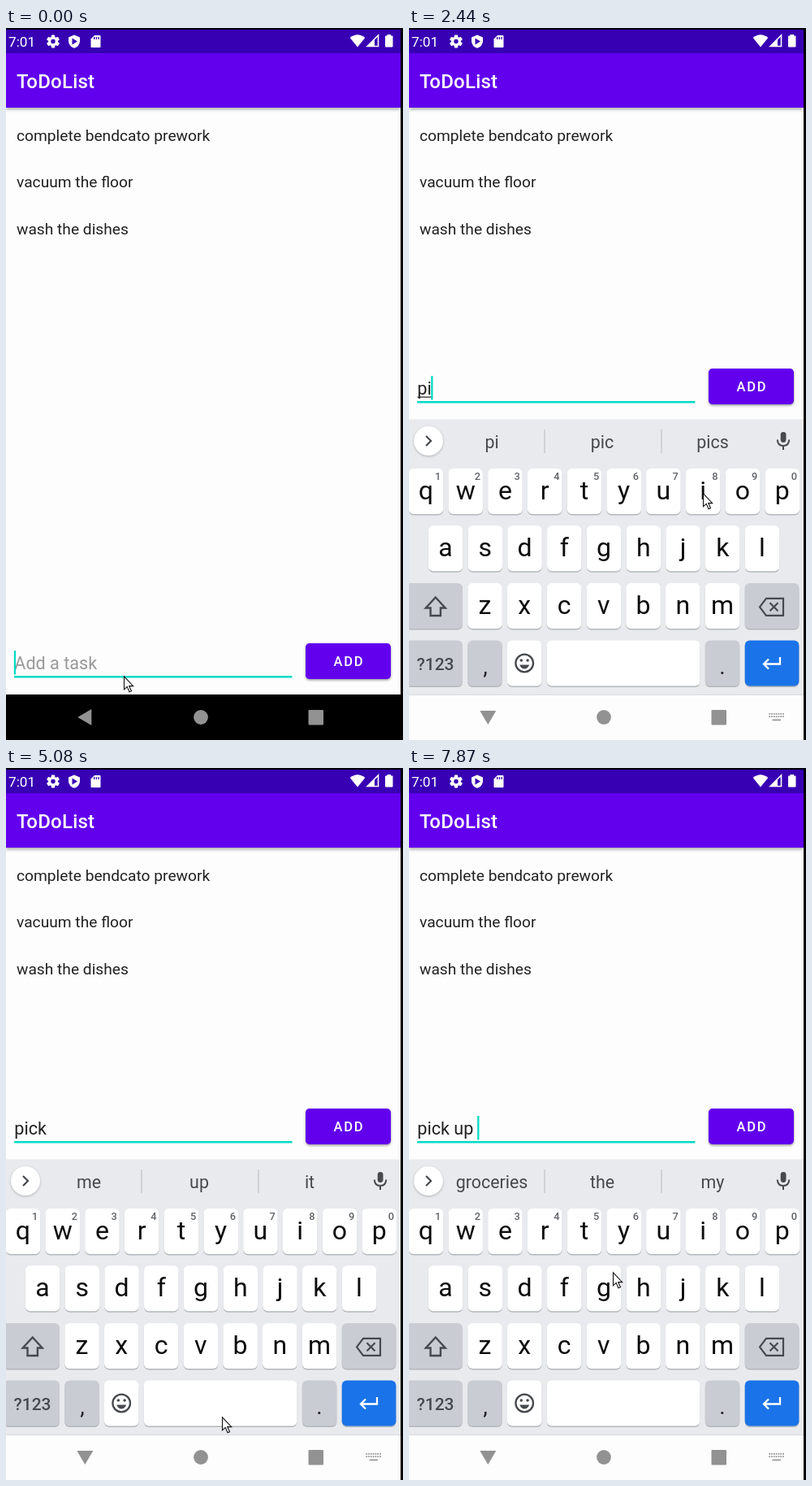
Recreate the animation shown at these times as an HTML page with a canvas. Size 489 px wide and 876 px high, loop 8 s.

```html
<!DOCTYPE html>
<html lang="en">
<head>
<meta charset="utf-8">
<title>To-do list</title>
<style>
html, body { margin: 0; width: 100%; height: 100%; overflow: hidden; background: #000; }
canvas { display: block; }
</style>
</head>
<body>
<canvas id="stage" width="489" height="876"></canvas>
<script>
const ctx = document.getElementById('stage').getContext('2d');
const LOOP = 8000, W = 486, LIFT = 338;
const INK = '#46494d', TEAL = '#03dac5', PURPLE = '#6200ee';

// The screen refreshes in evenly spaced bursts: [first, last, steps]
const ticks = [0, 150];
for (const [a, b, n] of [[430, 1460, 8], [1750, 2710, 8], [2860, 3850, 8], [4000, 4960, 8],
  [5080, 5740, 6], [6040, 6970, 8], [7090, 7870, 7]]) {
  for (let i = 0; i < n; i++) ticks.push(Math.round(a + (b - a) * i / (n - 1)));
}

// Edits: time, text, composing, suggestions
const edits = [
  [-70, '', false, null],
  [1880, 'p', true, ['p', 'pick', 'put']],
  [2430, 'pi', true, ['pi', 'pic', 'pics']],
  [3560, 'pic', true, ['pic', 'pick', 'pics']],
  [4130, 'pick', true, ['pick', 'picked', 'pics']],
  [4540, 'pick ', false, ['me', 'up', 'it']],
  [6560, 'pick up', false, ['groceries', 'the', 'g']],
  [7480, 'pick up ', false, ['groceries', 'the', 'my']]
];

// Pointer path: time, x, y
const path = [
  [0, 145, 797], [149, 145, 797], [150, 155, 789], [577, 158, 786], [724, 179, 768],
  [1460, 456, 568], [1890, 456, 568], [2299, 365, 570], [2436, 362, 572], [2710, 273, 729],
  [2860, 215, 743], [3280, 178, 713], [3567, 178, 713], [3850, 250, 685], [4130, 381, 640],
  [4274, 381, 640], [4549, 275, 808], [5080, 266, 798], [5400, 342, 782], [5740, 335, 760],
  [6430, 251, 512], [6970, 251, 512], [7350, 240, 840], [7480, 240, 844], [7860, 251, 620]
];

const clamp = v => Math.max(0, Math.min(1, v));
const lastBefore = (list, t, key) => list.filter(e => key(e) <= t).pop();

function rect(x, y, w, h, color, r = 0) {
  ctx.fillStyle = color;
  ctx.beginPath();
  ctx.roundRect(x, y, w, h, r);
  ctx.fill();
}

function disc(x, y, r, color) {
  ctx.fillStyle = color;
  ctx.beginPath();
  ctx.arc(x, y, r, 0, Math.PI * 2);
  ctx.fill();
}

function text(s, x, y, size, color, { weight = 400, align = 'left', space = 0 } = {}) {
  ctx.font = `${weight} ${size}px Roboto, sans-serif`;
  ctx.letterSpacing = space + 'px';
  ctx.textAlign = align;
  ctx.fillStyle = color;
  ctx.fillText(s, x, y);
  return ctx.measureText(s).width;
}

function shape(d, x, y, { fill, stroke, width = 2 } = {}) {
  const p = new Path2D(d);
  ctx.save();
  ctx.translate(x, y);
  ctx.lineWidth = width;
  if (fill) { ctx.fillStyle = fill; ctx.fill(p); }
  if (stroke) { ctx.strokeStyle = stroke; ctx.stroke(p); }
  ctx.restore();
}

function shadow(blur, dy, color, draw) {
  ctx.save();
  ctx.shadowBlur = blur;
  ctx.shadowOffsetY = dy;
  ctx.shadowColor = color;
  draw();
  ctx.restore();
}

function statusBar() {
  const bar = '#3700b3', on = '#fff';
  rect(0, 2, W, 29, bar);
  text('7:01', 3, 23, 17.2, on);
  for (let i = 0; i < 6; i++) {
    ctx.save();
    ctx.translate(58, 16.5);
    ctx.rotate(i * Math.PI / 3);
    rect(-2.2, -8, 4.4, 5, on, 1);
    ctx.restore();
  }
  disc(58, 16.5, 5.9, on);
  disc(58, 16.5, 2.7, bar);
  shape('M0-8 L7-5 V0 Q6.5 6 0 8.3 Q-6.5 6-7 0 V-5Z', 84, 16.5, { fill: on });
  shape('M-2.5-4 L4 0 L-2.5 4Z', 84, 16.5, { fill: bar });
  shape('M-1.5-7.5 H5 Q6-7.5 6-6.5 V6.5 Q6 7.5 5 7.5 H-5 Q-6 7.5-6 6.5 V-3Z', 110.5, 16.5, { fill: on });
  for (let i = 0; i < 3; i++) rect(108 + i * 2.7, 11, 1.3, 3, bar);
  shape('M0 7.5 L-9.3-4 Q0-11.5 9.3-4Z', 433, 16, { fill: on });
  shape('M-7 6.5 L6.5-7 V6.5Z', 452, 16, { stroke: on, width: 1.6 });
  shape('M-7 7 L2-2.5 V7Z', 452, 16, { fill: on });
  rect(467, 9.5, 9.5, 14, on, 1);
  rect(469.5, 8, 4.5, 3, on);
}

function app(t, lift) {
  rect(0, 2, W, 874, '#fdfdfd');
  shadow(4, 1.5, 'rgba(0,0,0,.35)', () => rect(0, 31, W, 67, PURPLE));
  statusBar();
  text('ToDoList', 13, 74, 24, '#fff', { weight: 500, space: 0.2 });
  ['complete bendcato prework', 'vacuum the floor', 'wash the dishes']
    .forEach((s, i) => text(s, 13, 138.5 + i * 57.5, 19.2, '#212121'));

  const [since, typed, composing] = lastBefore(edits, t, e => e[0]);
  const y = -lift;
  const width = text(typed, 10.3, y + 788.7, 21.6, '#212121');
  if (!typed) text('Add a task', 10.3, y + 788.7, 21.6, '#999');
  if (composing) rect(10.5, y + 791.5, width, 1.2, '#212121');
  rect(10, y + 797, 342.5, 2.4, TEAL);
  if (Math.floor((t - since) / 500) % 2 === 0) rect(9.8 + width, y + 766, 2.3, 29.5, TEAL);

  shadow(3, 1.5, 'rgba(0,0,0,.4)', () => rect(369, y + 757, 105, 44, PURPLE, 4.7));
  text('ADD', 403.5, y + 785.3, 16.5, '#fff', { weight: 500, space: 1.8 });
}

function key(x, y, w, color = '#fff') {
  rect(x, y + 1.2, w, 56.2, '#b4b7bb', 6);
  rect(x, y, w, 56, color, 6);
}

function letters(row, x, y) {
  [...row].forEach((c, i) => {
    const left = x + i * 48.75;
    key(left, y, 42.5);
    text(c, left + 21.2, y + 38, 32, '#0c0c0c', { align: 'center' });
  });
}

function mic() {
  rect(457.7, 497, 6.8, 13, INK, 3.4);
  shape('M-7.2-2 Q-7 5.5 0 5.5 Q7 5.5 7.2-2 M0 5.5 V10.5', 461, 508.5, { stroke: INK, width: 2 });
}

function toolbar(words) {
  shadow(3, 1, 'rgba(0,0,0,.25)', () => disc(24, 508, 18, '#fff'));
  shape(words ? 'M-3-6 L3 0 L-3 6' : 'M3-6 L-3 0 L3 6', 24, 508, { stroke: INK, width: 2.2 });
  mic();
  if (words) {
    words.forEach((w, i) => text(w, 102 + i * 136, 517, 21.4, INK, { align: 'center' }));
    rect(166.4, 494, 1.2, 29, '#bfc2c6');
    rect(310.4, 494, 1.2, 29, '#bfc2c6');
    return;
  }
  const line = { stroke: '#5a5d61', width: 2.2 };
  ctx.lineCap = 'butt';
  shape('M4-3 A6.5 6.5 0 1 1 -9-3 A6.5 6.5 0 1 1 4-3 M2 2 L9.5 9.5', 90, 508.5, line);
  shape('M-6.5-8.5 H6.5 Q8.5-8.5 8.5-6.5 V3 L3 8.5 H-6.5 Q-8.5 8.5-8.5 6.5 V-6.5 Q-8.5-8.5-6.5-8.5Z', 160.5, 508, line);
  shape('M8.5 2 H4 Q2.5 2 2.5 4 V8.5 M-5 1 Q-3 5 0 4.5', 160.5, 508, line);
  disc(156.8, 504.7, 1.5, INK);
  disc(164, 504.7, 1.5, INK);
  text('GIF', 216.5, 514.2, 16.5, '#5a5d61', { weight: 900, space: 1.1 });
  shape('M-8.5-7.5 H8.5 V10 H-8.5Z M-4.5 0 H4.5 M-4.5 4.5 H2', 303, 508, line);
  rect(298, 499, 10, 6, '#5a5d61', 1);
  disc(303, 499, 2.6, '#5a5d61');
  rect(346, 494, 1.2, 28, '#c8cacd');
  for (let i = -1; i < 2; i++) disc(390 + i * 7.8, 508.7, 2.4, '#5a5d61');
}

function keyboard(off, words) {
  const gray = '#c9ccd3';
  ctx.save();
  ctx.beginPath();
  ctx.rect(0, 0, W, 876);
  ctx.clip();
  ctx.translate(0, off);
  rect(0, 481, W, 340, '#e8eaed');
  rect(0, 481, W, 1, '#f3f4f5');
  rect(0, 820, W, 1, '#d8dadc');
  rect(0, 821, W, 56, '#fdfdfd');
  toolbar(words);

  letters('qwertyuiop', -0.3, 542);
  [...'1234567890'].forEach((d, i) =>
    text(d, 35.7 + i * 48.75, 556, 12.8, '#606368', { weight: 500, align: 'center' }));
  letters('asdfghjkl', 23.8, 612.3);
  letters('zxcvbnm', 72.3, 683);

  key(-4, 683, 70, gray);
  shape('M0-11.5 L12 1.5 H6.2 V11 H-6.2 V1.5 H-12Z', 32.7, 712, { stroke: INK, width: 2.4 });
  key(413.7, 683, 66.7, gray);
  shape('M-15 0 L-7-10.5 H14 V10.5 H-7Z M-2.5-5 L7.5 5 M7.5-5 L-2.5 5', 447, 712.3, { stroke: INK, width: 2.2 });

  key(-4, 753.5, 70, gray);
  text('?123', 32.5, 789.5, 21, INK, { weight: 500, align: 'center' });
  key(72.3, 753.5, 42.5, gray);
  text(',', 94, 795, 28, '#222', { align: 'center' });
  key(121, 753.5, 42.5);
  shape('M10.8 0 A10.8 10.8 0 1 1 -10.8 0 A10.8 10.8 0 1 1 10.8 0Z', 142.2, 781.5, { stroke: INK, width: 2.3 });
  shape('M-6 2 H6 Q4 7 0 7 Q-4 7-6 2Z', 142.2, 781.5, { fill: INK });
  disc(138.3, 778, 1.8, INK);
  disc(146.1, 778, 1.8, INK);
  key(169.8, 753.5, 188.5);
  key(364.8, 753.5, 42.5, gray);
  text('.', 386, 795, 28, '#222', { align: 'center' });
  key(413.7, 753.5, 66.7, '#1a73e8');
  shape('M10-7 V1.5 H-9.5 M-4-4.5 L-10 1.5 L-4 7.5', 447, 781, { stroke: '#fff', width: 2.3 });
  ctx.restore();
}

function navIcons(turn, switcher) {
  const c = '#929292';
  ctx.save();
  ctx.translate(97.3, 848);
  ctx.rotate(-turn * Math.PI / 2);
  shape('M-9 0 L8-10 V10Z', 0, 0, { fill: c });
  ctx.restore();
  disc(240, 848, 8.9, c);
  rect(372.5, 839, 18.5, 18.5, c, 1);
  if (!switcher) return;
  for (let i = 0; i < 14; i++) rect(443.3 + i % 7 * 2.8, 843 + Math.floor(i / 7) * 3.3, 1.8, 1.8, '#999');
  rect(447.5, 850.5, 10.5, 1.8, '#999');
}

function pointer(t) {
  const i = Math.max(1, path.findIndex(p => p[0] > t));
  const b = t >= path[path.length - 1][0] ? path[path.length - 1] : path[i];
  const a = b === path[i] ? path[i - 1] : b;
  const k = a === b ? 0 : (t - a[0]) / (b[0] - a[0]);
  shape('M0 0 V16 L3.7 12.6 L6.5 19 L9 18 L6.2 11.8 H11.2Z',
    a[1] + (b[1] - a[1]) * k + 0.5, a[2] + (b[2] - a[2]) * k + 0.8,
    { fill: '#fff', stroke: '#111', width: 1.1 });
}

function draw(time) {
  const t = lastBefore(ticks, time % LOOP, v => v);
  const shown = t > 544;
  rect(0, 0, 489, 876, '#000');
  app(t, shown ? LIFT : 0);
  rect(0, 820, 489, 56, '#000');
  rect(W, 0, 3, 876, '#000');
  if (shown) {
    const rest = 1 - clamp((t - 544) / 300);
    keyboard(396 * rest * rest, lastBefore(edits, t, e => e[0])[3]);
  }
  navIcons(clamp((t - 695) / 170), t > 860);
  pointer(t);
}

let start;
function frame(now) {
  start ??= now;
  draw(now - start);
  requestAnimationFrame(frame);
}
draw(0);
requestAnimationFrame(frame);
</script>
</body>
</html>
```
